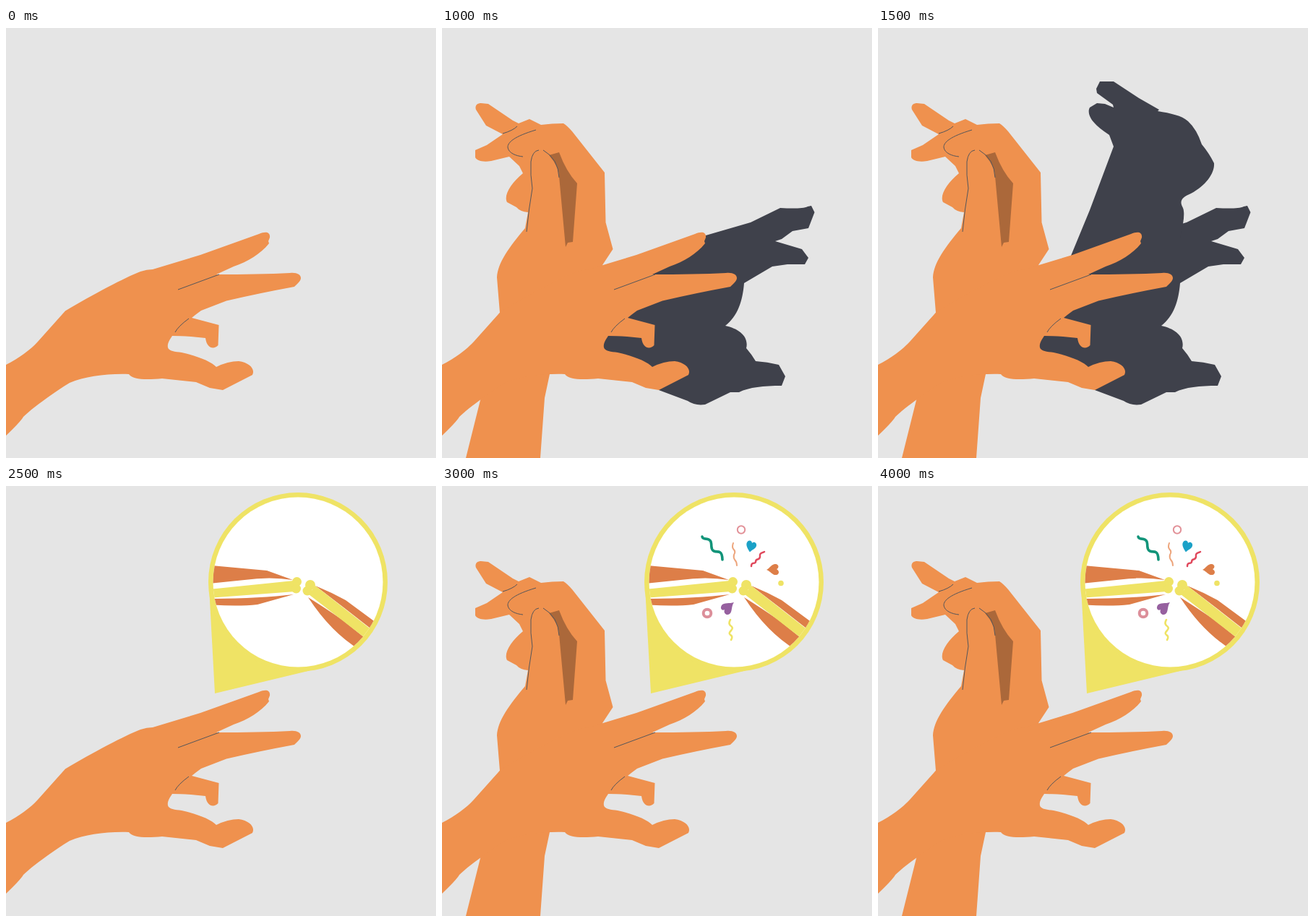
An HTML page that plays this animation: 595x595 px, repeating every 4.5 s.

```html
<!DOCTYPE html>
<html lang="en">
<head>
<meta charset="utf-8">
<title>Shadow hands</title>
<style>
  html, body { margin: 0; width: 100%; height: 100%; overflow: hidden; background: #e5e5e5; }
  svg { display: block; width: 100%; height: 100%; }
  .scene { visibility: hidden; }
  .skin { fill: #ef914e; }
  .shadow { fill: #3f414b; }
  .crease { fill: none; stroke: #55565a; stroke-width: 1; }
  .bone { fill: #efe365; }
  .muscle { fill: #dd7e48; }
  .wave { fill: none; stroke-linecap: round; stroke-linejoin: round; }
</style>
</head>
<body>
<svg viewBox="0 0 595 595">
  <defs>
    <clipPath id="lens"><circle cx="404" cy="133" r="117.5"/></clipPath>
  </defs>

  <path id="lowShadow" class="scene shadow" d="M350 292 L365 287 L427 269 L468 249 C485 250 500 250 506 247 L511 246 L515.5 255
    L507 277 L485 281 L470 292 L461 295 L498 306 L507 318 L502 327 H478 L457 330 L418 353 C416 378 409 399 392 412
    C411 416 425 427 421 443 Q428 451 434 461 Q450 462 466 466 L475 482 L470 495 C445 495 425 497 411 504 H399 L364 521
    Q350 523 340 516 L300 501 L296 495 L230 455 L215 440 L240 400 L250 330 Z"/>

  <path id="highShadow" class="scene shadow" d="M267 315 L293 252 L326 164 L320 148 Q305 138 300 132 C292 124 290 115 293 110
    L303 104 L314 105 L326 110 L325 106 L303 90 L302 84 L307 74 H326 L361 97 L389 113 L387 115 C405 118 420 121 429 129
    Q441 140 448 161 Q458 173 465 187 C466 200 455 217 433 229 C421 234 417 239 421 247 Q425 253 422 271 L418 290
    L365 340 L267 330 Z"/>

  <g id="backHand" class="scene">
    <path class="skin" d="M47 113 C45 107 49 104 54 104 L64 105 L98 128 L106 132 L121 126 L137 134 Q152 132 168 132
      Q173 135 180 143 L225 200 L226.500 269 L236.500 306 L222 328 L215 400 L152 465 L149 479 L142 512 L136 595 H33
      L53 515 L60 487 L80 394 L76 345 C77 325 93 303 115 277 L119 255 Q108 254 103 248 L90 241 C85 232 95 215 112 201
      L107 191 L93 178 L68 184 C55 186 48 183 46 179 L46 169 L62 162 L84 147 L61 135 Z"/>
    <path fill="#ab683a" d="M148 176 L162 172 Q172 199 187 215 L181 296 L174 297 L171 303 L162 205 Q162 192 148 176 Z"/>
    <path class="crease" d="M130 141 C100 150 91 158 91 165 C92 173 102 177 112 178 M104 136 Q98 142 84 146
      M117 282 Q120 250 125 222 Q122 203 123 185 Q125 170 134 169 M140 169 Q161 181 162 207"/>
  </g>

  <g id="frontHand" class="scene">
    <path class="skin" d="M0 466 C18 457 34 445 44 434 L82 391.500 C120 369 165 345 186 337 Q195 334 203 334 L269 314 L350 285
      C359 281 366 282 365 290 L363 295 L364 298 C352 313 335 323 315 330 L291 341 Q350 341 393 339
      C402 338 408 341 408 346 C408 350 403 354 399 358 Q350 367 305 377.500 L270 391 Q263 396 257 401 L294.500 411 L293.500 439
      C288 445 278 444 276 429 L256 427 Q240 426 230 426 C226 432 223 437 224 442 C225 447 234 448 243 449
      C262 453 284 461 291 469 Q307 461 322 461 C337 463 345 472 341 480 L300 501 L282 498 L263 490 L216 485
      C195 487 175 487 170 479 C140 478 110 482 88 491 C65 505 35 527 24 538 Q20 545 0 564 Z"/>
    <path class="crease" d="M238 362 L295 341 M234 421 Q238 413 253 402"/>
  </g>

  <g id="bubble" class="scene">
    <path class="bone" d="M281 140 L289 287 L420 255.500 Z"/>
    <circle class="bone" cx="404" cy="133" r="124"/>
    <circle fill="#fff" cx="404" cy="133" r="117.500"/>
    <g clip-path="url(#lens)">
      <path class="muscle" d="M280 109.500 L290 110.500 L361 117 L397 130 Q365 125 330 130 L280 135 Z
        M280 156 Q350 156 398 150 L348 164 Q320 167 280 164 Z
        M428 138 Q450 147 470 158 L516 192 L512 203 Q470 170 428 138 Z
        M418 154 Q445 171 465 185 L500 213 L490 227 Q450 203 418 154 Z"/>
      <path class="bone" d="M280 143 L398 131 L400 146 L280 155 Z M428 138 L516 207 L508 219 L419 150 Z"/>
      <circle class="bone" cx="402.500" cy="132.500" r="6.500"/>
      <circle class="bone" cx="401.500" cy="142" r="6.500"/>
      <circle class="bone" cx="421" cy="137" r="7"/>
      <circle class="bone" cx="417" cy="145" r="6.500"/>
    </g>
  </g>

  <g id="confetti" class="scene">
    <path class="wave" stroke="#129479" stroke-width="3.6" d="M360 70 C361 76 369 70 372 77 C374 84 371 87 376 90 C381 92 385 89 387 95 Q388 98 388 102"/>
    <path class="wave" stroke="#eda57c" stroke-width="2" d="M403 79 Q401 84 403 87 Q407 91 404 95 Q403 99 405 102 Q408 105 408 110"/>
    <path class="wave" stroke="#e0485c" stroke-width="2.500" d="M428 111 C428 104 433 109 434 105 C434 99 439 104 440 98 C439 92 443 93 446 91"/>
    <path class="wave" stroke="#efe365" stroke-width="2.600" d="M399 185 Q396 190 399 193 Q404 196 400 200 Q396 204 399 206 Q403 208 400 213"/>
    <circle cx="414" cy="60.500" r="5.200" fill="none" stroke="#e29198" stroke-width="2"/>
    <circle cx="367" cy="176" r="5.300" fill="none" stroke="#dc8f9a" stroke-width="4"/>
    <circle class="bone" cx="469" cy="134.500" r="3.800"/>
    <path fill="#1ba1c7" d="M426 91.500 C423 87 420 82 422 78 C424 74 429 75 429 79 C432 76 436 79 435 83 C434 87 429 88 426 91.500 Z"/>
    <path class="muscle" d="M449 116 C454 113 457 107 462 108 C467 109 466 114 463 115 C467 117 467 122 463 123 C457 124 455 118 449 116 Z"/>
    <path fill="#96609f" d="M404 161 C398 163 390 161 387 165 C384 170 388 173 391 171 C389 176 394 180 398 177 C402 174 400 166 404 161 Z"/>
  </g>
</svg>
<script>
  const STEP = 500;
  // Parts on show during each step of the loop.
  const steps = [
    ['frontHand'],
    ['frontHand', 'lowShadow'],
    ['frontHand', 'lowShadow', 'backHand'],
    ['frontHand', 'lowShadow', 'backHand', 'highShadow'],
    [],
    ['frontHand', 'bubble'],
    ['frontHand', 'bubble', 'backHand', 'confetti'],
    ['frontHand', 'bubble'],
    ['frontHand', 'bubble', 'backHand', 'confetti']
  ];
  const scenes = document.querySelectorAll('.scene');
  const start = performance.now();

  function draw() {
    const elapsed = Math.max(0, performance.now() - start);
    const visible = steps[Math.floor(elapsed / STEP) % steps.length];
    for (const scene of scenes) {
      scene.style.visibility = visible.includes(scene.id) ? 'visible' : 'hidden';
    }
    requestAnimationFrame(draw);
  }
  draw();
</script>
</body>
</html>
```
